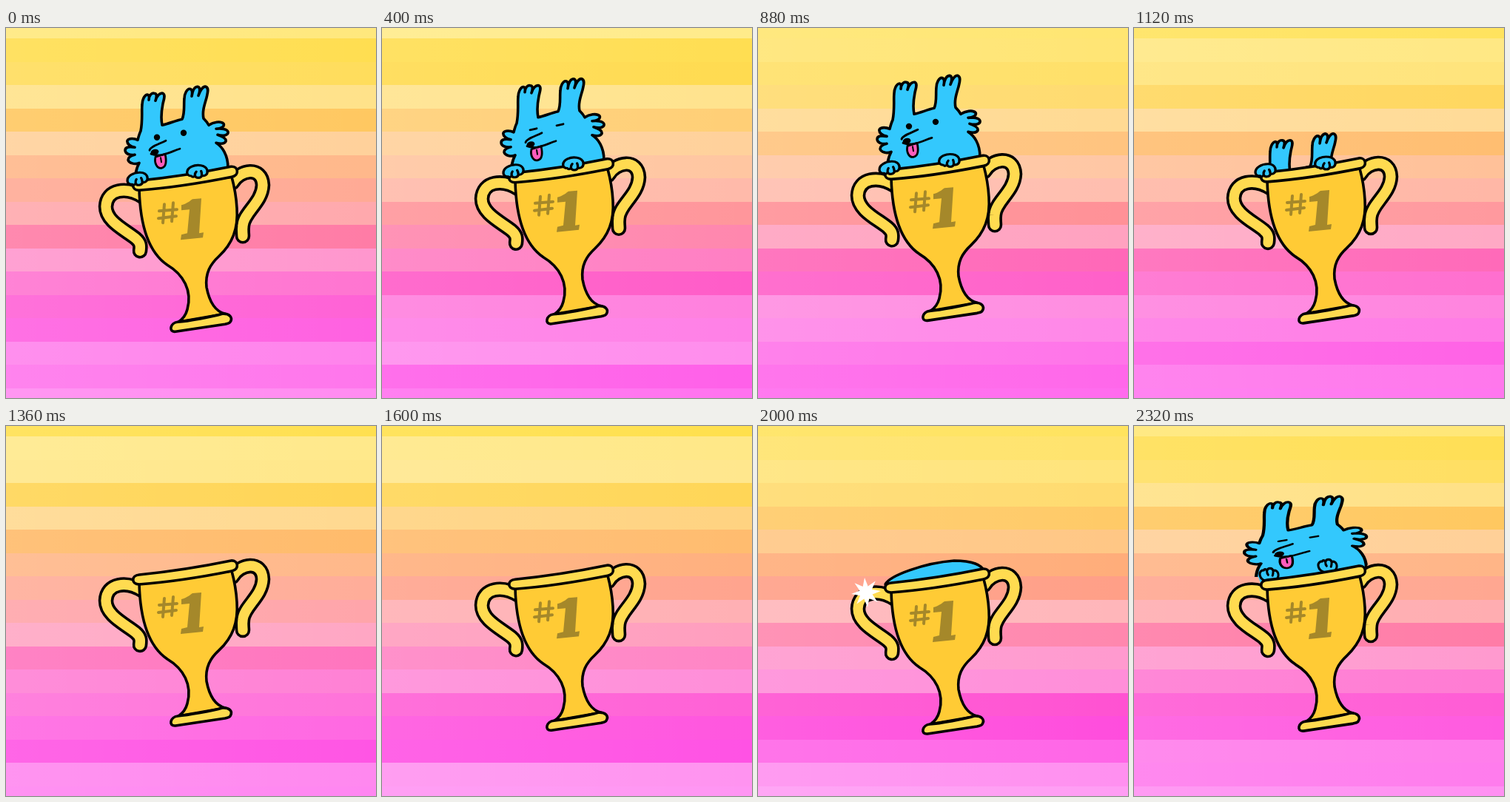
An HTML page that plays this animation: 500x500 px, repeating every 2.4 s.

```html
<!DOCTYPE html>
<html lang="en">
<head>
<meta charset="utf-8">
<title>Number one cup</title>
<style>
  html, body { margin: 0; width: 100%; height: 100%; overflow: hidden; }
  svg { display: block; width: 100vw; height: 100vh; }
  .line { stroke: #000; stroke-width: 3.6; stroke-linecap: round; stroke-linejoin: round; }
  .thin { stroke: #000; stroke-width: 2.8; stroke-linecap: round; fill: none; }
  .blue { fill: #33c8fd; }
  .bowl { fill: #ffcb35; }
  .gold { fill: #ffdb50; }
  .rail { fill: none; stroke-linecap: round; stroke: #000; stroke-width: 20.5; }
  .rail.in { stroke: #ffdb50; stroke-width: 13.3; }
  .mark { fill: #a5882a; }
  .hash { fill: none; stroke: #a5882a; stroke-width: 4; stroke-linecap: round; }
  .rays { stroke: #fff; stroke-width: 2.2; stroke-linecap: round; fill: none; }
</style>
</head>
<body>
<svg viewBox="0 0 500 500" preserveAspectRatio="none">
  <defs>
    <clipPath id="above"><path d="M0-100H500V186H316L312 195L172 214L168 203H0Z"/></clipPath>
    <linearGradient id="sheen">
      <stop offset="0" stop-color="#fff" stop-opacity=".1"/>
      <stop offset="1" stop-color="#fff" stop-opacity="0"/>
    </linearGradient>
    <path id="hand" d="M-9 8C-18 8-17-3-9-7C-1-11 12-10 14-1C15 6 10 9 6 7C5 12-3 12-4 7C-5 10-8 10-9 8ZM-4 7C-4 4-3 2-2 1M6 7C6 4 6 2 5 0"/>
    <path id="leftRail" d="M185 229C163 215 136 218 135 242C135 262 160 273 175 285C182 291 182 295 181 302"/>
    <path id="rightRail" d="M306 210C316 192 346 187 347 213C346 237 321 250 320 268C319 275 320 277 320 282"/>
  </defs>

  <g id="bands" shape-rendering="crispEdges"></g>
  <rect width="500" height="500" fill="url(#sheen)"/>

  <g id="cup">
    <use href="#leftRail" class="rail"/><use href="#leftRail" class="rail in"/>
    <use href="#rightRail" class="rail"/><use href="#rightRail" class="rail in"/>

    <g clip-path="url(#above)">
      <path id="dome" class="line blue" d="M172 209C178 197 225 180 265 177C290 177 303 183 305 191L305 215H172Z"/>
      <g id="pup">
        <path class="line blue" d="M182 140C185 125 183 112 184 104C184 98 187 92 190 91C193 90 194 93 193 98
          C193 92 197 88 200 89C204 89 204 93 202 99C204 92 208 88 212 89C216 91 213 98 212 103C210 113 209 122 211 132
          C220 130 229 126 238 124C242 116 240 104 241 96C241 89 245 83 248 83C252 83 252 88 251 93
          C252 86 254 80 259 80C263 81 262 87 260 92C262 86 266 79 270 80C275 82 272 90 271 95C268 105 265 114 267 123
          C270 126 272 128 274 132C280 128 290 126 294 130C296 134 290 137 284 137C290 136 299 137 300 141
          C301 146 293 147 286 145C292 147 298 150 297 154C295 158 288 157 284 156C292 161 300 172 300 190
          V225H175C173 203 175 192 180 183C174 186 166 183 165 179C165 175 170 173 174 172C168 173 161 171 161 166
          C161 161 168 161 174 162C168 161 163 157 164 153C166 149 174 150 178 152C179 148 180 144 182 140Z"/>
        <g id="open"><circle cx="204" cy="148.500" r="4.200"/><circle cx="240" cy="142.500" r="4.200"/></g>
        <path id="shut" class="thin" d="M200 149L209 147M236 143L245 141"/>
        <path d="M202 175C200 183 204 191 210 190C217 189 217 180 215 171Z" fill="#ff5cbc" class="line" style="stroke-width:2.800"/>
        <path class="thin" style="stroke-width:2" d="M209 176L210 182"/>
        <path class="thin" d="M194 166C195 161 206 158 216 153"/>
        <path class="thin" d="M196 171C210 176 222 168 235 164"/>
        <ellipse cx="201" cy="168.500" rx="5.500" ry="4" transform="rotate(-15 201 168.500)"/>
      </g>
      <g id="peek" class="line blue">
        <use href="#hand" transform="translate(183 201) scale(.85 -.9)"/>
        <use href="#hand" transform="translate(262 189) scale(.85 -.9)"/>
      </g>
    </g>

    <path class="line bowl" d="M180 218C181 262 190 302 218 321C240 334 252 356 245 381C243 389 239 394 233 398L296 387
      C284 384 275 372 271 351C269 332 276 320 288 309C306 292 314 272 312 244C311 227 308 213 305 202Z"/>
    <path class="line gold" d="M232 398C245 397 280 391 292 387C302 386 307 392 303 398C302 400 300 400 296 401
      C275 404 250 408 229 411C219 412 222 399 232 398Z"/>
    <path class="line gold" d="M180 207C220 203 265 196 304 188C314 187 316 200 305 202C265 210 220 217 180 220C169 220 169 208 180 207Z"/>
    <g role="img" aria-label="#1">
      <path class="hash" d="M214 239L212 264M226 237L224 262M207 248L231 246M206 258L230 255"/>
      <path class="mark" d="M237 240C245 238 249 234 252 232L264 231L261 278L267 277L266 284L236 287L237 280L245 278L248 246L237 247Z"/>
    </g>
    <g id="grip" class="line blue">
      <use href="#hand" transform="translate(178 204) rotate(-8) scale(.93 .85)"/>
      <use href="#hand" transform="translate(259 194) scale(.93 .85)"/>
    </g>
    <g id="sparkle">
      <path id="star" fill="#fff"/>
      <path id="rays" class="rays" d="M-26-14L-17-12M-1-28V-19M17-17L13-12M-30-2L-19 0M-18 15L-13 12M-1 19V28M12 13L20 18M21 6H29"/>
    </g>
  </g>
</svg>
<script>
const LOOP = 2400, STEP = 80, BAND = 31.5;
const $ = id => document.getElementById(id);
const show = (id, on) => { $(id).style.display = on ? "" : "none"; };
const lerp = (a, b, k) => a + (b - a) * k;
const wave = (t, peak) => Math.cos(2 * Math.PI * (t - peak) / LOOP);
const progress = (t, from, to) => Math.min(1, Math.max(0, (t - from) / (to - from)));

// Evenly spaced stops of the backdrop, top to bottom
const stops = [[255, 221, 60], [255, 214, 66], [255, 176, 98], [255, 134, 140],
  [255, 76, 190], [255, 58, 222], [255, 92, 236]];
// Moment in the loop, in percent, when each stripe is palest
const palest = [15, 58, 65, 10, 45, 8, 28, 30, 80, 50, 90, 75, 33, 30, 14, 73, 80];

function toneAt(k) {
  const n = Math.min(stops.length - 2, Math.floor(k * (stops.length - 1)));
  const part = k * (stops.length - 1) - n;
  return stops[n].map((c, j) => lerp(c, stops[n + 1][j], part));
}

const bands = palest.map((percent, i) => {
  const rect = document.createElementNS("http://www.w3.org/2000/svg", "rect");
  const top = i ? Math.round(14 + (i - 1) * BAND) : 0;
  rect.setAttribute("y", top);
  rect.setAttribute("width", 500);
  rect.setAttribute("height", Math.round(14 + i * BAND) - top);
  $("bands").append(rect);
  return { rect, tone: toneAt(i / (palest.length - 1)), peak: percent / 100 * LOOP };
});

function paintBands(t) {
  for (const { rect, tone, peak } of bands) {
    const white = .24 + .16 * wave(t, peak);
    rect.setAttribute("fill", `rgb(${tone.map(c => Math.round(lerp(c, 255, white)))})`);
  }
}

function starPath(r) {
  const points = Array.from({ length: 16 }, (_, i) => {
    const d = i % 2 ? r * .45 : r;
    const a = i * Math.PI / 8 - .1;
    return `${(d * Math.sin(a)).toFixed(1)} ${(-d * Math.cos(a)).toFixed(1)}`;
  });
  return `M${points.join("L")}Z`;
}

function sparkle(t, start, x, y) {
  const n = (t - start) / STEP;
  if (n < 0 || n > 2) return false;
  $("sparkle").setAttribute("transform", `translate(${x} ${y})`);
  $("star").setAttribute("d", starPath([10, 20, 4][n]));
  show("rays", n === 2);
  return true;
}

function movePup(t) {
  const sink = t < 2000
    ? 150 * progress(t, 960, 1280)
    : 160 * (1 - progress(t, 2000, 2240)) ** 2;
  const squash = Math.max(0, 1 - Math.abs(t - 2320) / STEP);
  const sx = 1 + .187 * squash, sy = 1 - .12 * squash;
  $("pup").setAttribute("transform",
    `translate(${225 * (1 - sx)} ${197 * (1 - sy) + sink}) scale(${sx} ${sy})`);
  show("pup", t < 1280 || t >= 2080);

  const shut = (t >= 320 && t < 480) || t >= 2240;
  show("shut", shut);
  show("open", !shut);
  show("grip", t < 1280);
  show("peek", (t >= 1280 && t < 1360) || t >= 2320);
}

function draw(t) {
  paintBands(t);
  $("cup").setAttribute("transform", `translate(0 ${-5.5 + 10.5 * wave(t, 1980)})`);
  movePup(t);
  show("dome", t >= 1920 && t < 2080);
  $("dome").setAttribute("transform", `translate(0 ${12 * (1 - progress(t, 1920, 2000))})`);
  show("sparkle", sparkle(t, 480, 284, 318) || sparkle(t, 1920, 146, 220));
}

const begin = performance.now();
function tick() {
  const t = (performance.now() - begin) % LOOP;
  draw(Math.floor(t / STEP) * STEP);
  requestAnimationFrame(tick);
}
tick();
</script>
</body>
</html>
```
